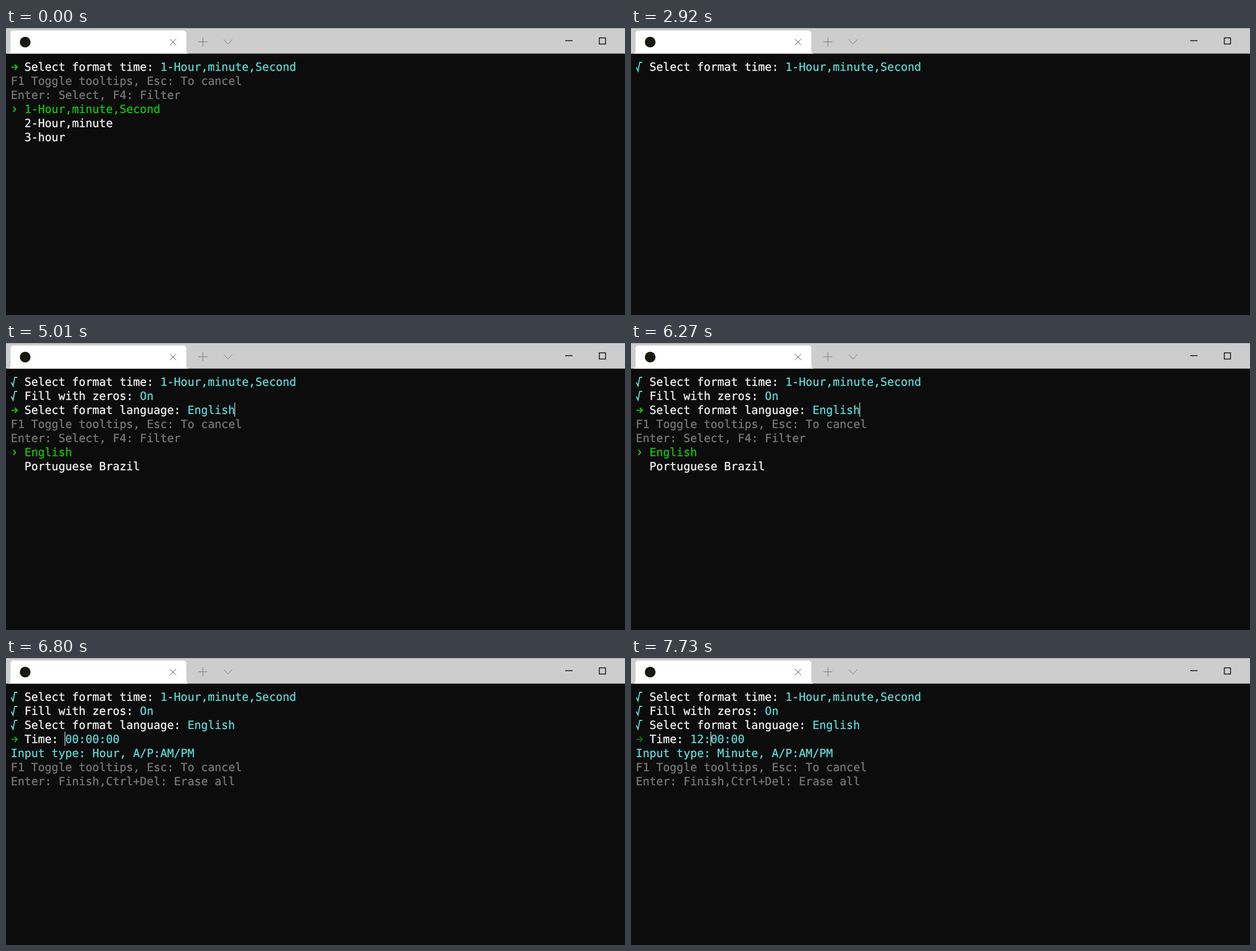
These frames come from a looping animation (1097x510 px, 8 s). An HTML page:

```html
<!DOCTYPE html>
<html lang="en">
<head>
<meta charset="utf-8">
<title>Terminal prompts</title>
<style>
html, body { margin: 0; width: 100%; height: 100%; overflow: hidden; background: #0c0c0c; }
svg { display: block; }
text {
  font: 20px "DejaVu Sans Mono", monospace;
  white-space: pre;
  text-rendering: geometricPrecision;
  stroke-width: .35px;
}
.line { fill: none; }
</style>
</head>
<body>
<svg width="1097" height="510" viewBox="0 0 1097 510">
  <rect width="1097" height="510" fill="#0c0c0c"/>
  <rect width="1097" height="45.5" fill="#cdcdcd"/>
  <rect width="1097" height="1" fill="#a3a3a3"/>
  <path d="M3 45.5Q8 45 8 40V10Q8 4.500 13.500 4.500H314Q319.500 4.500 319.500 10V40Q319.500 45 324 45.500Z" fill="#fff"/>
  <circle cx="34" cy="25" r="9.500" fill="#181810"/>
  <path class="line" d="M290.500 19.500l11 11m0-11l-11 11" stroke="#555"/>
  <path class="line" d="M341 24.500h16m-8-8v16M386 20.500l7.500 8 7.500-8" stroke="#777"/>
  <path class="line" d="M991 22.500h13M1051.500 17.500h11v11h-11z" stroke="#111" stroke-width="1.500"/>
  <g id="screen"></g>
  <rect id="cursor" width="1" height="25" fill="#fff"/>
</svg>
<script>
const LOOP = 8000, CELL = 12.04, ROW = 25, LEFT = 8.6, TOP = 56;
const WHITE = '#f2f2f2', CYAN = '#61d6d6', GRAY = '#767676', GREEN = '#16c60c';
const DIM = '#126f0d', DARK = '#125c0d', MID = '#14a00c';

const colX = col => LEFT + col * CELL;
const rowY = row => TOP + row * ROW;

const put = (row, col, color, text) =>
  `<text x="${colX(col)}" y="${rowY(row) + 20}" fill="${color}" stroke="${color}">${text}</text>`;
const icon = (row, color, path, width) =>
  `<path class="line" transform="translate(9 ${rowY(row)})" d="${path}" stroke="${color}" stroke-width="${width}"/>`;
const arrow = (row, color = GREEN) => icon(row, color, 'M.500 13.500h10M6.500 9l4.500 4.500-4.500 4.500', 2.2);
const check = row => icon(row, CYAN, 'M.500 14l3 6.500L6.500 5H11', 1.900);
const pointer = row => icon(row, GREEN, 'M4 9l4 4.500-4 4.500', 2.2);
const block = (row, col, color) =>
  `<rect x="${Math.round(colX(col))}" y="${rowY(row)}" width="24" height="${ROW}" fill="${color}"/>`;

const ask = (row, label, value) =>
  put(row, 2, WHITE, label) + put(row, label.length + 3, CYAN, value);
const tips = (row, second) =>
  put(row, 0, GRAY, 'F1 Toggle tooltips, Esc: To cancel') + put(row + 1, 0, GRAY, second);
const menu = (row, [first, ...rest]) =>
  tips(row, 'Enter: Select, F4: Filter') + pointer(row + 2) + put(row + 2, 2, GREEN, first) +
  rest.map((item, i) => put(row + 3 + i, 2, WHITE, item)).join('');

const format = ask(0, 'Select format time:', '1-Hour,minute,Second');
const zeros = ask(1, 'Fill with zeros:', 'On');
const language = ask(2, 'Select format language:', 'English');

const choice = arrow(0) + format + menu(1, ['1-Hour,minute,Second', '2-Hour,minute', '3-hour']);
const formatDone = check(0) + format;
const toggle = formatDone + arrow(1, DARK) + zeros +
  put(1, 23, GRAY, '| Off') + block(1, 29, GRAY) + block(1, 31, CYAN) + put(1, 34, GRAY, 'On |') +
  put(2, 0, GRAY, 'F1 Toggle tooltips, Esc: To cancel, Left/Right: Change, Enter: Finish');
const zerosDone = formatDone + check(1) + zeros;
const languages = zerosDone + arrow(2) + language + menu(3, ['English', 'Portuguese Brazil']);
const languageDone = zerosDone + check(2) + language;

const timeLine = (value, color) => languageDone + arrow(3, color) + ask(3, 'Time:', value);
const clock = (value, part, color) => timeLine(value, color) +
  put(4, 0, CYAN, `Input type: ${part}, A/P:AM/PM`) + tips(5, 'Enter: Finish,Ctrl+Del: Erase all');

// [start time, content, cursor cell as row and column]
const steps = [
  [0, choice],
  [730, choice, [0, 42]],
  [1260, choice],
  [1790, choice, [0, 42]],
  [2320, choice],
  [2920, formatDone],
  [2990, toggle],
  [5010, languages, [2, 33]],
  [5680, languages],
  [6270, languages, [2, 33]],
  [6740, languageDone],
  [6800, clock('00:00:00', 'Hour', MID), [3, 8]],
  [7400, timeLine('10:00:00', DIM)],
  [7460, clock('10:00:00', 'Hour', DIM), [3, 9]],
  [7660, timeLine('12:00:00', DIM)],
  [7730, clock('12:00:00', 'Minute', DIM), [3, 11]]
];

const screenBox = document.getElementById('screen');
const cursor = document.getElementById('cursor');
let shown;

function draw() {
  const time = performance.now() % LOOP;
  const step = steps.findLast(([start]) => start <= time);
  if (step !== shown) {
    const [, content, cell] = shown = step;
    screenBox.innerHTML = content;
    cursor.style.display = cell ? '' : 'none';
    if (cell) {
      cursor.setAttribute('x', Math.floor(colX(cell[1])));
      cursor.setAttribute('y', rowY(cell[0]));
    }
  }
  requestAnimationFrame(draw);
}
draw();
</script>
</body>
</html>
```
